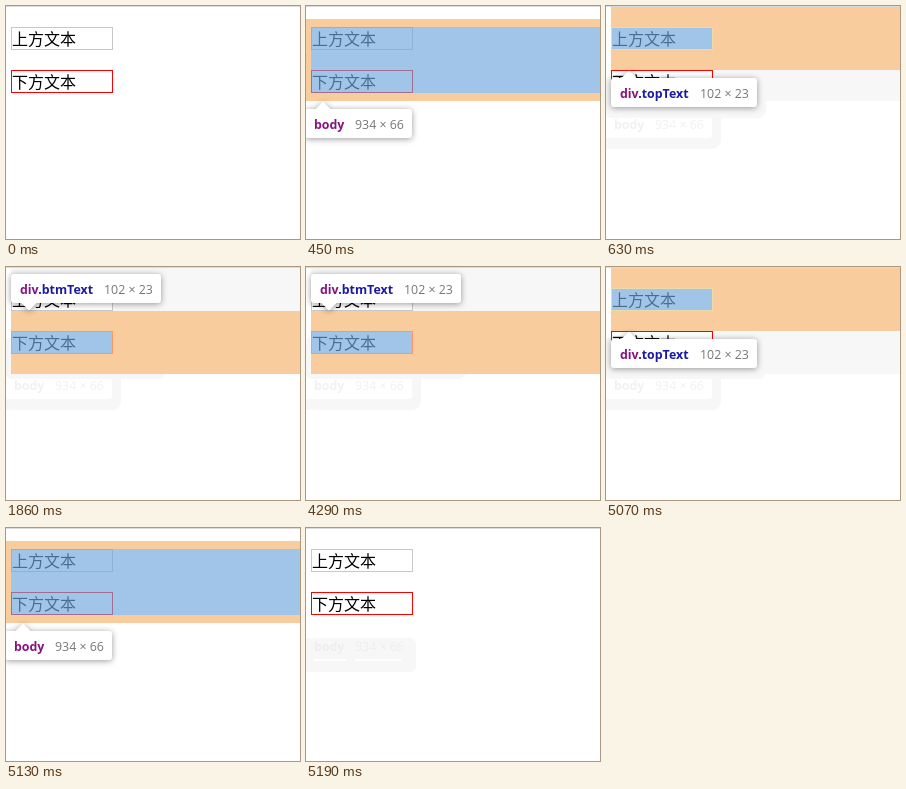
An HTML page for the animation above (5790 ms loop, 294 px wide and 233 px high).

```html
<!DOCTYPE html>
<html lang="zh">
<head>
<meta charset="utf-8">
<style>
html, body { margin: 0; width: 100%; height: 100%; overflow: hidden; background: #fff; }
svg { display: block; width: 294px; height: 233px; }
.page { font: 16px "Noto Sans CJK SC", "Noto Sans CJK", sans-serif; }
.label { font: 12.4px "Open Sans", "Noto Sans", sans-serif; }
.bubble { filter: drop-shadow(0 1px 3px rgba(0, 0, 0, .4)); }
.label .bold { font-weight: 700; }
</style>
</head>
<body>
<svg id="stage" viewBox="0 0 294 233"></svg>
<script>
const LOOP = 5790;
const MARGIN = 'rgba(246,178,107,.66)';
const CONTENT = 'rgba(111,168,220,.66)';
const BORDER = 'rgba(255,229,153,.66)';
const FAINT = '#f7f7f7';

const rect = (x, y, w, h, fill, r = 0) =>
  `<rect x="${x}" y="${y}" width="${w}" height="${h}" rx="${r}" fill="${fill}"/>`;
const text = (x, y, s, fill, cls = '') =>
  `<text x="${x}" y="${y}" fill="${fill}" class="${cls}">${s}</text>`;
const ring = (y, color, fill = 'none') =>
  `<rect x="5.5" y="${y + .5}" width="101" height="22" fill="${fill}" stroke="${color}"/>`;

const page = `<g class="page">${rect(0, 0, 294, 1, '#dcdcdc')}
  ${ring(21, '#c8c8c8', '#fff')}${text(6, 39, '上方文本', '#000')}
  ${ring(64, '#f00', '#fff')}${text(6, 82, '下方文本', '#000')}</g>`;

// Margin area with a hole for the element's box
const margin = (x, y, h, ix, iy, iw, ih) =>
  `<path fill-rule="evenodd" fill="${MARGIN}" d="M${x} ${y}H294V${y + h}H${x}ZM${ix} ${iy}h${iw}v${ih}h${-iw}Z"/>`;

function tip(x, y, w, tag, cls, dimX, dim, up) {
  const a = x + 18;
  const arrow = up ? `M${a - 8} ${y + .5}l8 -8l8 8Z` : `M${a - 8} ${y + 28.5}l8 8l8 -8Z`;
  return `<g class="bubble"><path fill="#fff" d="${arrow}"/>${rect(x, y, w, 29, '#fff', 3)}</g>
    <g class="label">${text(x + 9, y + 20, `<tspan fill="#881280">${tag}</tspan>${cls}`, '#1a1aa6', 'bold')}
    ${text(dimX, y + 20, dim, '#777')}</g>`;
}

// The margin strip spans the full width; the bordered box sits inside it
const boxOverlay = y => margin(5, y - 20, 63, 5, y, 102, 23) +
  rect(6, y + 1, 100, 21, CONTENT) + ring(y, BORDER);
const bodyOverlay = margin(-3, 13, 82, 5, 21, 289, 66) + rect(5, 21, 289, 66, CONTENT) +
  tip(-1, 103, 107, 'body', '', 49, '934 × 66', true);

// Faint remains of earlier highlights
const bodyText = color => text(8, 123, 'body', color, 'bold') + text(49, 123, '934 × 66', color);
const trace = `<g class="label">${rect(-8, 96, 123, 47, FAINT, 9)}
  ${rect(-1, 103, 107, 29, '#fff', 3)}${bodyText('#f1f1f1')}</g>` +
  rect(-2, 70, 162, 42, FAINT, 8);
const endTrace = `<g class="label">${rect(-8, 110, 118, 34, FAINT, 6)}
  ${bodyText('#eee')}${rect(8, 131, 32, 2, '#fff')}${rect(49, 131, 46, 2, '#fff')}</g>`;

const upper = bottom => trace + rect(5, 64, 289, bottom - 64, FAINT) + page +
  boxOverlay(21) + tip(5, 72, 146, 'div', '.topText', 94, '102 × 23', true);
const lower = trace + rect(5, 1, 289, 43, FAINT) + rect(5, 44, 289, 63, '#fff') + page +
  boxOverlay(64) + tip(5, 7, 150, 'div', '.btmText', 98, '102 × 23', false);

const scenes = [
  [0, page],
  [450, page + bodyOverlay],
  [630, upper(95)],
  [1860, lower],
  [3570, upper(107)],
  [4290, lower],
  [5070, upper(107)],
  [5100, page + bodyOverlay],
  [5160, `${page}<g opacity=".3">${bodyOverlay}</g>`],
  [5190, endTrace + page]
];

const stage = document.getElementById('stage');
const start = performance.now();
let shown;
function draw() {
  const t = Math.max(0, performance.now() - start) % LOOP;
  const scene = scenes.findLast(([at]) => t >= at);
  if (scene !== shown) stage.innerHTML = (shown = scene)[1];
  requestAnimationFrame(draw);
}
draw();
</script>
</body>
</html>
```
